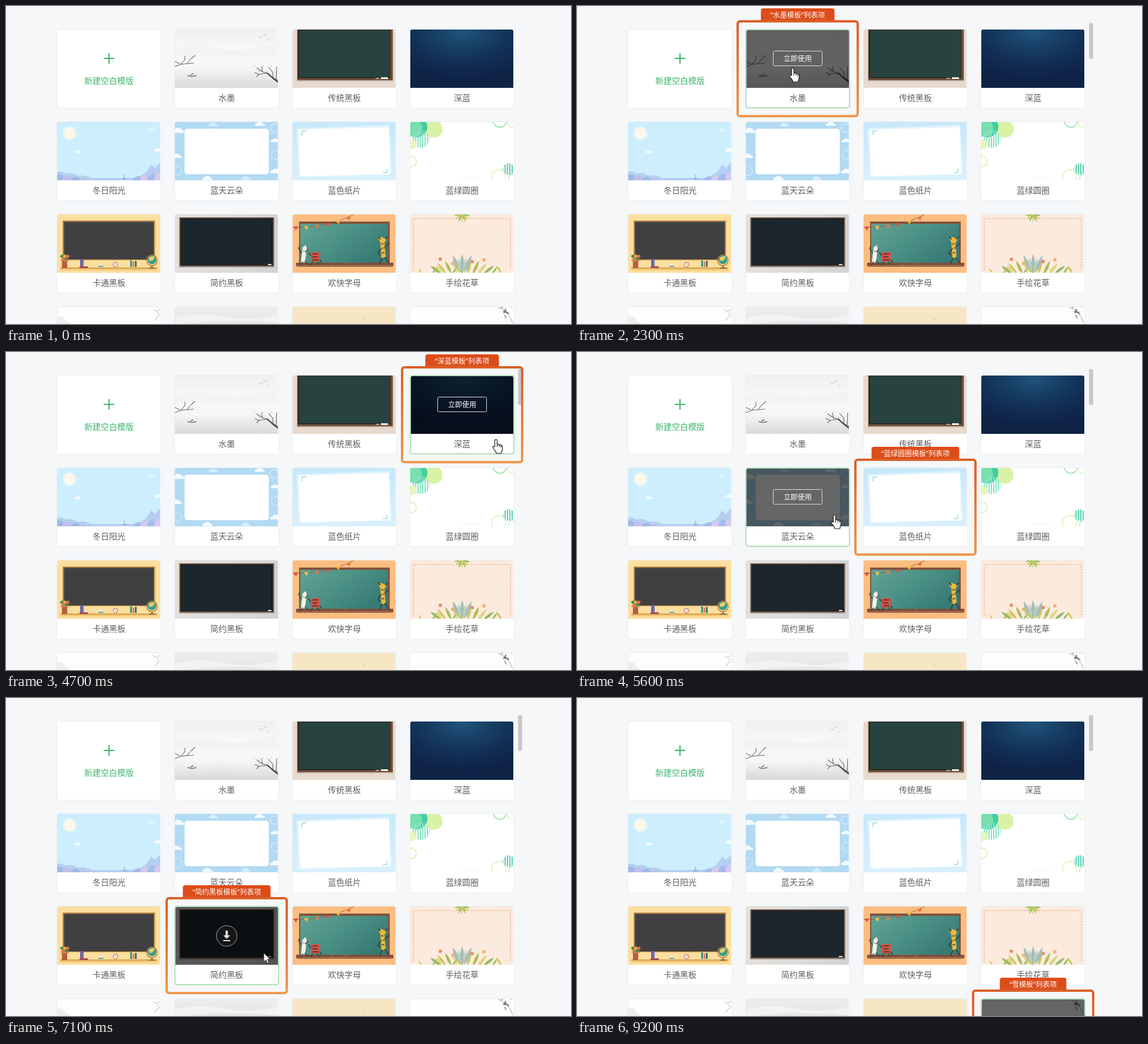
Write an HTML page that moves like this. It is 960 by 540 pixels and loops after 9900 ms.

```html
<!DOCTYPE html>
<html lang="zh-CN">
<head>
<meta charset="utf-8">
<title>模板列表</title>
<style>
  html, body { margin: 0; width: 100%; height: 100%; overflow: hidden; background: #f5f7f9; }
  svg { display: block; width: 100vw; height: 100vh; }
  text { font: 14px "Noto Sans", "Noto Sans CJK SC", "Noto Sans CJK", sans-serif; text-anchor: middle; fill: #5c5e60; }
  .small { font-size: 12px; fill: #fff; }
  .add { fill: #3db56b; }
</style>
</head>
<body>
<svg id="stage" viewBox="0 0 960 540"></svg>
<script>
const rect = (x, y, w, h, fill, more = '') =>
  `<rect x="${x}" y="${y}" width="${w}" height="${h}" fill="${fill}" ${more}/>`;
const circle = (x, y, r, fill, more = '') =>
  `<circle cx="${x}" cy="${y}" r="${r}" fill="${fill}" ${more}/>`;
const ring = (x, y, r, color, width = 1.5) =>
  circle(x, y, r, 'none', `stroke="${color}" stroke-width="${width}"`);
const shape = (d, fill, more = '') => `<path d="${d}" fill="${fill}" ${more}/>`;
const line = (d, color, width = 1, more = '') =>
  shape(d, 'none', `stroke="${color}" stroke-width="${width}" stroke-linecap="round" stroke-linejoin="round" ${more}`);
const at = (x, y, body, more = '') => `<g transform="translate(${x} ${y}) ${more}">${body}</g>`;
const repeat = (n, draw) => Array.from({ length: n }, (_, i) => draw(i)).join('');
const stops = colors => colors.map((c, i) =>
  `<stop offset="${i / (colors.length - 1)}" stop-color="${c}"/>`).join('');
const gradient = (id, ...colors) =>
  `<linearGradient id="${id}" x2="0" y2="1">${stops(colors)}</linearGradient>`;
const stripes = (id, color) =>
  `<pattern id="${id}" width="4" height="4" patternUnits="userSpaceOnUse">${rect(0, 0, 2.2, 4, color)}</pattern>`;

const defs = `<defs>
  ${gradient('ink', '#f0f0ef', '#f8f8f7', '#f6f6f5', '#d9d9d9')}
  ${gradient('mist', '#ededee', '#dfe0e2', '#eee')}
  ${gradient('paper', '#c8e8fb', '#d9f0fc')}
  ${gradient('orange', '#dc6029', '#ee984f')}
  ${gradient('tab', '#e04a17', '#d84f1c')}
  <linearGradient id="plaster">${stops(['#e4dfda', '#dedcda', '#d2d1d2'])}</linearGradient>
  <linearGradient id="jade" y2=".6">${stops(['#62a495', '#4c9186', '#377b75'])}</linearGradient>
  <radialGradient id="night" cx=".5" cy=".05" r=".8">${stops(['#20547a', '#173f65', '#122d54', '#0f2347'])}</radialGradient>
  ${stripes('mint', '#8be3c4')}
  ${stripes('teal', '#5dd0b2')}
  <clipPath id="thumb">${shape('M0 99V3Q0 0 3 0H172Q175 0 175 3V99Z', '#000')}</clipPath>
</defs>`;

const cloud = (x, y, s = 1, fill = '#f4fbff') =>
  at(x, y, shape('M-9 4Q-10-1-5-1Q-3-6 1-3Q5-4 6 0Q11 0 10 4Z', fill), `scale(${s})`);
const leaf = (x, y, length, angle, fill) =>
  at(x, y, shape(`M0 0Q${-length / 5}${-length / 2} 0${-length}Q${length / 5}${-length / 2} 0 0Z`, fill), `rotate(${angle})`);
const twig = line('M0 0L-9-5L-19-13L-27-15L-37-22M-9-5L-10-15L-17-23M-19-13L-33-11L-40-14M-27-15L-29-24M-33-11L-37-7M-4-2L-3-24', '#6a6160', 1.1) +
  line('M2 4L-9-4L-19-13', '#4b4443', 2.2);

function inkScene() {
  return rect(0, 0, 176, 99, 'url(#ink)') +
    shape('M0 32Q35 25 70 32T140 30T176 33V46H0Z', '#efefee', 'opacity=".5"') +
    at(176, 87, twig) +
    line('M0 63L10 59L20 58L28 49L34 44M10 59L17 51L17 45M20 58L32 57M0 54L8 58', '#716869', 1.1) +
    line('M22 78Q29 81 36 78M27 77L31 75', '#777', 1.4) +
    line('M144 13l3 1l2-2M151 8l2 2l3-1M157 17l2 1l2-2', '#aaa', .7) +
    repeat(5, i => circle(136 + i * 7, 62 + i % 2 * 9, .9, '#dcb8b5'));
}

function classicBoard() {
  return rect(0, 0, 176, 99, '#e7dace') + rect(7, -3, 164, 91, '#cbb9a9') +
    rect(8, -3, 162, 89, '#6b4b35') + rect(9, -3, 157, 86, '#2f251e') +
    rect(11, 1, 154, 80, '#28423f') + rect(9, 83, 158, 1, '#83644b') +
    rect(150, 81, 12, 3, '#f3f1e8') + rect(141, 82, 6, 2, '#b8a696');
}

function winterScene() {
  return rect(0, 0, 176, 99, '#cdeefd') + circle(21, 19, 12, '#e3f4f6') + circle(21, 19, 9.5, '#fff8ea') +
    cloud(35, 50, .6) + cloud(160, 13, .7, '#e0f5ff') + cloud(172, 47, .8) +
    shape('M0 85Q8 82 14 88Q24 84 34 91Q48 90 58 95H125Q142 94 152 84L160 72L166 78L176 68V99H0Z', '#b5cef1') +
    repeat(4, i => circle(3 + i * 14, 99 + i, 10 - i, i % 2 ? '#bfc0e9' : '#9fb8e6')) +
    repeat(4, i => circle(138 + i * 12, 101 - i * 2, 9, i % 2 ? '#d6c9ec' : '#a5bcec')) +
    line('M114 97V90M111 96H118', '#7f9acb');
}

function cloudFrame() {
  return rect(0, 0, 176, 99, '#b3daf4') + cloud(6, 14, 1.1) + cloud(65, 4, .8, '#d7effd') +
    cloud(144, 3, .9) + cloud(170, 31, .8) + cloud(2, 57, 1) + cloud(171, 83, 1) + cloud(55, 95, .9) +
    cloud(120, 95, .8, '#d7effd') + ring(169, 10, 7, '#e6f6ff', 1) + ring(3, 83, 8, '#dff3ff', 1) + ring(172, 56, 8, '#e0f4ff', 1) +
    rect(16, 11, 144, 78, '#fff', 'rx="5" stroke="#a5cfeb" stroke-width=".6"');
}

function paperFrame() {
  return rect(0, 0, 176, 99, 'url(#paper)') +
    shape('M7 11L164 5L169 88L10 95Z', '#e3f4fd') + shape('M10 13L163 9L166 89L13 92Z', '#fff') +
    line('M16 22V15H23M160 80V86H154', '#9bd7da', 1.5);
}

function circleScene() {
  return rect(0, 0, 176, 99, '#fff') + circle(40, 12, 15, '#d9f3a6') + circle(11, 8, 18, '#43cda3') +
    circle(5, 10, 15, '#78dfae') + circle(18, 29, 15, 'url(#mint)') + circle(3, 38, 8, '#e6f6bd') +
    ring(1, 67, 9, '#d6efad') + ring(152, -2, 11, '#a6e5bd', 2) + ring(171, 3, 6, '#d9f0ba') +
    circle(167, 80, 10, 'url(#teal)') + ring(150, 93, 12, '#dcf1b6') + ring(174, 96, 7, '#b9eacb') +
    line('M96 93H120M84 96H112', '#f2f6e9', 1);
}

function cartoonBoard() {
  const book = (x, h, color) => rect(x, 89 - h, 3, h, color);
  return rect(0, 0, 176, 99, '#fcdf9f') + rect(9, 10, 158, 68, '#e2b061') +
    rect(10, 11, 155, 66, '#8d6b42') + rect(12, 13, 152, 63, '#404042') +
    rect(5, 90, 165, 2, '#d5a14b') + rect(5, 92, 165, 3, '#f2c878') +
    rect(8, 78, 9, 13, '#b65d42') + rect(6, 76, 14, 3, '#d4924c') +
    repeat(5, i => circle(8 + i * 2.5, 71 + i % 2 * 4, 2.8, ['#4c8b56', '#e36d50', '#f0b244'][i % 3])) +
    book(39, 13, '#6762a3') + book(42, 13, '#7771b5') + rect(38, 88, 14, 3, '#a84b58') +
    shape('M69 89Q73 80 78 89Z', '#f4f3eb') + rect(70, 87, 8, 2, '#50a4b0') +
    circle(99, 85, 4.5, '#c98a70') + circle(99, 85, 3, '#fff') + line('M99 83V85H101', '#666', .6) +
    book(124, 11, '#389582') + book(128, 9, '#e4824e') + book(132, 10, '#356b85') +
    ring(161, 78, 9, '#bd7c35', 1.5) + circle(161, 77, 7.5, '#3c9c8c') + shape('M155 74Q161 69 166 72L162 78L157 79Z', '#e9cf68') +
    rect(160, 87, 2, 4, '#93602f') + rect(156, 90, 10, 2, '#93602f');
}

function plainBoard() {
  return rect(0, 0, 176, 99, 'url(#plaster)') + rect(7, 5, 162, 85, '#a8a19d') +
    rect(8, 5, 160, 83, '#5b4536', 'rx="1"') + rect(10, 7, 156, 79, '#171b1e') +
    rect(11, 8, 153, 77, '#1c262d') + rect(158, 84, 6, 2, '#ddd');
}

function happyBoard() {
  const flagColors = ['#d94f43', '#f1bd42', '#e67a43'];
  return rect(0, 0, 176, 99, '#fcbd80') + rect(11, 12, 154, 75, '#81543d') + rect(13, 16, 149, 67, 'url(#jade)') +
    rect(6, 82, 165, 6, '#7e4f3b') + rect(9, 86, 159, 3, '#a26a4d') +
    line('M0 22Q62 22 104 0', '#795448', .8) +
    repeat(6, i => at(5 + i * 18, 21 - i * i * .65, shape('M-4 0L4-1L1 6Z', flagColors[i % 3]))) +
    shape('M14 82L17 56L22 52L24 57L21 81Z', '#f5f1e5') + line('M15 65L10 58L12 54M22 64L26 59M17 80L13 86M21 79L27 85M18 62h1M21 62h1', '#3a3432', 1.2) +
    shape('M31 64H45Q50 67 45 72Q50 78 44 80H31Z', '#d65345') + line('M34 67H43M34 72H42M34 77H43M31 70L27 65M46 77L49 81M34 80L31 86M42 80L45 85', '#39312e', 1.3) +
    shape('M146 42L150 38L160 42L156 48L158 72L151 75L149 47Z', '#edb83f') +
    line('M149 42L146 38M158 42L161 38M151 58L145 65L148 69M157 55L164 49M152 74L148 83M157 73L163 82M151 50h3M154 57h2M152 65h3', '#3e332d', 1.5) +
    line('M64 88L70 82M83 89L91 82', '#b98a6a', .7);
}

function flowerScene() {
  const greens = ['#8fba62', '#cfca5a', '#a9bd5c', '#dcd37c'];
  return rect(0, 0, 176, 99, '#fdeadf') +
    line('M5 94V7H170V94', '#dfa171', 1, 'stroke-dasharray="2 3"') +
    repeat(7, i => leaf(88, 0, 14, 100 + i * 27, greens[i % 4])) +
    repeat(9, i => leaf(88 + (i - 4) * 9, 101, 27 - Math.abs(i - 4), (i - 4) * 13, greens[i % 4])) +
    repeat(5, i => leaf(88 + (i - 2) * 2, 99, 32 - i % 2 * 6, (i - 2) * 11, i % 2 ? '#bfcfc0' : '#a3bfb8')) +
    repeat(9, i => leaf(20 + i * 17, 101, 12 + i % 3 * 3, i % 2 ? 35 : -35, greens[(i + 1) % 4])) +
    repeat(4, i => circle([51, 72, 105, 125][i], [76, 83, 80, 77][i], 3, i % 2 ? '#efb66f' : '#ea8f63'));
}

const darkLeaves = repeat(8, i =>
  leaf(153 + i * 3.2, 2 + i % 3 * 5, 10, 60 + i * 47, i % 2 ? '#555' : '#929292')) +
  line('M150 1Q165 4 174 27', '#777', .7);

const thumbs = [
  () => '', inkScene, classicBoard, () => rect(0, 0, 176, 99, 'url(#night)'),
  winterScene, cloudFrame, paperFrame, circleScene,
  cartoonBoard, plainBoard, happyBoard, flowerScene,
  () => rect(0, 0, 176, 99, '#fdfdfd') + shape('M0 17Q7 11 16 25L30 32H0Z', '#eee') +
    line('M176 3L169 8L164 5M176 13L170 17L166 23M173 10L170 12', '#bbb2ad', 1),
  () => rect(0, 0, 176, 99, 'url(#mist)') + shape('M0 18Q40 8 86 17T176 12V28Q86 18 0 31Z', '#f2f2f2'),
  () => rect(0, 0, 176, 99, '#f6e6c5') + leaf(118, 22, 6, 65, '#e1bb8a'),
  () => rect(0, 0, 176, 99, '#fdfdfd') + darkLeaves,
];
const names = ['空白模板', '水墨', '传统黑板', '深蓝', '冬日阳光', '蓝天云朵', '蓝色纸片', '蓝绿圆圈',
  '卡通黑板', '简约黑板', '欢快字母', '手绘花草', '水墨梅花', '云雾', '秋色', '雪'];
const DOWNLOAD_CARD = 9;
const cardX = i => 87 + i % 4 * 200;
const cardY = i => 40 + Math.floor(i / 4) * 157;

function card(i) {
  const blank = line('M79 49H97M88 40V58', '#3db56b', 2, 'style="stroke-linecap:butt"') +
    '<text class="add" x="88" y="92">新建空白模版</text>';
  const content = i ? `<g clip-path="url(#thumb)">${thumbs[i]()}</g><text x="88" y="121">${names[i]}</text>` : blank;
  return at(cardX(i), cardY(i), rect(-.5, -.5, 177, 134, '#fff', 'rx="4" stroke="#e9edf0"') + content);
}

const useButton = rect(46.5, 36.5, 83, 25, 'none', 'rx="2" stroke="#ddd"') + '<text class="small" x="88" y="54">立即使用</text>';
const downloadButton = circle(88, 50, 17.5, '#222', 'fill-opacity=".4" stroke="#aaa"') +
  shape('M86 41H90V49H94L88 55L82 49H86Z', '#ddd') + rect(82, 57, 12, 2, '#ddd');

function hoverMarkup(i) {
  const button = i === DOWNLOAD_CARD ? downloadButton : useButton;
  const shade = i ? `<g clip-path="url(#thumb)">${rect(0, 0, 176, 99, '#000', 'opacity=".6"')}</g>${button}` : '';
  return at(cardX(i), cardY(i), shade + rect(0, 0, 176, 133, 'none', 'rx="4" stroke="#b2e0b8" stroke-width="2"'));
}

function focusMarkup(i, name) {
  const label = `“${name}模板”列表项`;
  const width = (label.length - 2) * 12 + 41;
  return at(cardX(i) - 16, cardY(i) - 16,
    shape(`M${104 - width / 2} 2v-18q0-4 4-4h${width - 8}q4 0 4 4v18z`, 'url(#tab)') +
    rect(2, 2, 204, 161, 'none', 'rx="4" stroke="url(#orange)" stroke-width="4"') +
    `<text class="small" x="104" y="-4">${label}</text>`);
}

const hand = shape('M4.5 13V2.5a2 2 0 0 1 4 0V9q3-1 3.8.7q2.4-.6 3 .9q2.2-.1 2.2 2v4c0 3-1.8 4-1.8 7.4H7C7 21 5 20 2 15.5C0 13 2 11 4.5 13Z', '#fff',
  'stroke="#16181a" stroke-width="1.2" stroke-linejoin="round"') + line('M8.5 9V13M12.2 10V13M15.2 11V14', '#16181a', 1);
const arrow = shape('M1 1V16L4.6 12.8L7 18.4L9.7 17.2L7.3 11.8H12Z', '#fff', 'stroke="#222" stroke-width=".9"');

// Hover and focus states are [start ms, card].
const hovers = [[400, 0], [1900, 1], [3100, 2], [4000, 3], [4800, 7], [5500, 6], [5600, 5], [6500, 9], [7300, 13], [7900, 14], [8900, 15]];
const focuses = [[1000, 0], [2000, 1], [3200, 2], [4100, 3], [4900, 7], [5600, 6, '蓝绿圆圈'], [5700, 5], [6600, 9], [7400, 13], [8000, 14], [9000, 15]];
const cursorPath = [[400, 140, 66], [600, 117, 101], [1800, 117, 101], [2000, 360, 105], [3000, 360, 105], [3200, 587, 113],
  [4000, 587, 113], [4100, 826, 148], [4700, 826, 148], [4900, 826, 230], [5400, 826, 230], [5600, 431, 276],
  [6400, 431, 276], [6600, 437, 432], [7100, 437, 432], [7500, 437, 570]];
const LOOP = 9900, STEP = 100;

const current = (list, t) => list.filter(([start]) => start <= t).pop();

function cursorMarkup(t) {
  const from = current(cursorPath, t);
  if (!from) return '';
  const to = cursorPath.find(([start]) => start > t) || from;
  const k = to === from ? 0 : (t - from[0]) / (to[0] - from[0]);
  return at(from[1] + (to[1] - from[1]) * k, from[2] + (to[2] - from[2]) * k, t < 6500 ? hand : arrow);
}

const stage = document.getElementById('stage');
stage.innerHTML = defs + rect(0, 0, 960, 540, '#f5f7f9') + repeat(16, card) + '<g id="live"></g>';
const live = document.getElementById('live');

function render(t) {
  const hover = current(hovers, t), focus = current(focuses, t);
  let markup = '';
  if (hover) markup += hoverMarkup(hover[1]) + rect(870, 29, 7, 61, '#c7c8c9', 'rx="3"');
  if (focus) {
    const opacity = Math.min(1, (t - 900) / 300);
    markup += `<g opacity="${opacity}">${focusMarkup(focus[1], focus[2] || names[focus[1]])}</g>`;
  }
  live.innerHTML = markup + cursorMarkup(t);
}

const begin = performance.now();
let shown = -1;
function tick() {
  const t = Math.floor((performance.now() - begin) % LOOP / STEP) * STEP;
  if (t !== shown) render(shown = t);
  requestAnimationFrame(tick);
}
tick();
</script>
</body>
</html>
```
